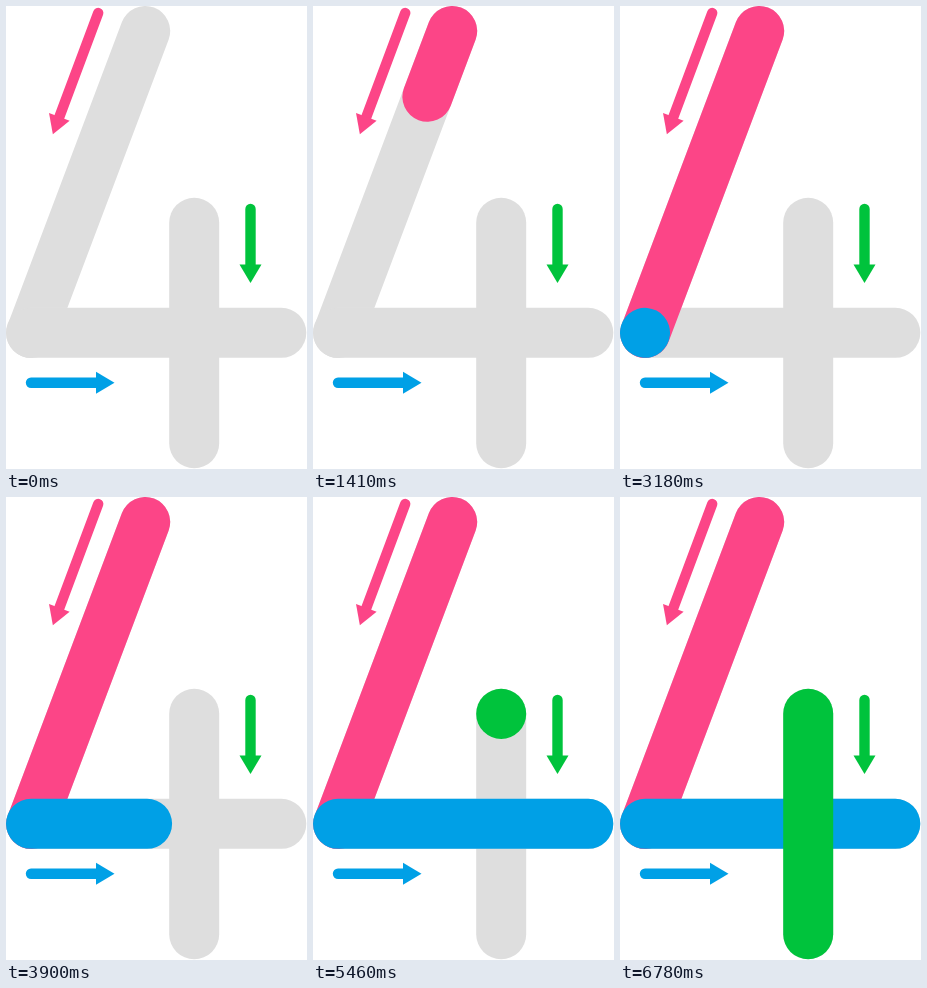
An HTML page for the animation above (8000 ms loop, 301x463 px).

```html
<!DOCTYPE html>
<html lang="en">
<head>
<meta charset="utf-8">
<title>Writing the number 4</title>
<style>
  html, body { margin: 0; width: 100%; height: 100%; overflow: hidden; background: #fff; }
  svg { display: block; width: 100%; height: 100%; }
  line, path { stroke-linecap: round; stroke-linejoin: round; fill: none; }
</style>
</head>
<body>
<svg id="stage" viewBox="0 0 301 463"></svg>
<script>
const LOOP = 8000;
const DRAW_TIME = 1333;
const PEN = 50;
const GREY = '#dedede';

const strokes = [
  { color: '#fc4587', start: 905, from: [139.2, 25], to: [25.2, 327],
    arrow: { x: 92.2, y: 7, angle: 110.5, length: 111 } },
  { color: '#00a0e6', start: 3172, from: [25, 326.8], to: [275.3, 326.8],
    arrow: { x: 25, y: 376.8, angle: 0, length: 65 } },
  { color: '#00c33c', start: 5438, from: [188.2, 216.8], to: [188.2, 437.2],
    arrow: { x: 244.5, y: 203, angle: 90, length: 55.5 } }
];

const stage = document.getElementById('stage');

function add(tag, attrs, parent = stage) {
  const node = document.createElementNS('http://www.w3.org/2000/svg', tag);
  for (const key in attrs) node.setAttribute(key, attrs[key]);
  return parent.appendChild(node);
}

function addLine([x1, y1], [x2, y2], color, width, parent) {
  return add('line', { x1, y1, x2, y2, stroke: color, 'stroke-width': width }, parent);
}

function addArrow({ x, y, angle, length }, color) {
  const group = add('g', { transform: `translate(${x} ${y}) rotate(${angle})` });
  addLine([0, 0], [length, 0], color, 10.4, group);
  add('polygon', { points: `${length},-11 ${length + 18.5},0 ${length},11`, fill: color }, group);
}

// Cubic Bezier easing through (0.505, 0) and (0.675, 1), solved by bisection.
function ease(t) {
  if (t <= 0) return 0;
  if (t >= 1) return 1;
  let low = 0, high = 1;
  for (let i = 0; i < 24; i++) {
    const s = (low + high) / 2, r = 1 - s;
    const x = 3 * r * r * s * 0.505 + 3 * r * s * s * 0.675 + s * s * s;
    if (x < t) low = s; else high = s;
  }
  return low * low * (3 - 2 * low);
}

for (const s of strokes) addLine(s.from, s.to, GREY, PEN);
for (const s of strokes) addArrow(s.arrow, s.color);
for (const s of strokes) s.line = addLine(s.from, s.from, s.color, PEN);

function render(time) {
  for (const { line, start, from, to } of strokes) {
    const p = ease((time - start) / DRAW_TIME);
    line.setAttribute('visibility', time < start ? 'hidden' : 'visible');
    line.setAttribute('x2', from[0] + (to[0] - from[0]) * p);
    line.setAttribute('y2', from[1] + (to[1] - from[1]) * p + 0.001);
  }
}

let origin;
function tick(now) {
  origin ??= now;
  render((now - origin) % LOOP);
  requestAnimationFrame(tick);
}
render(0);
requestAnimationFrame(tick);
</script>
</body>
</html>
```
